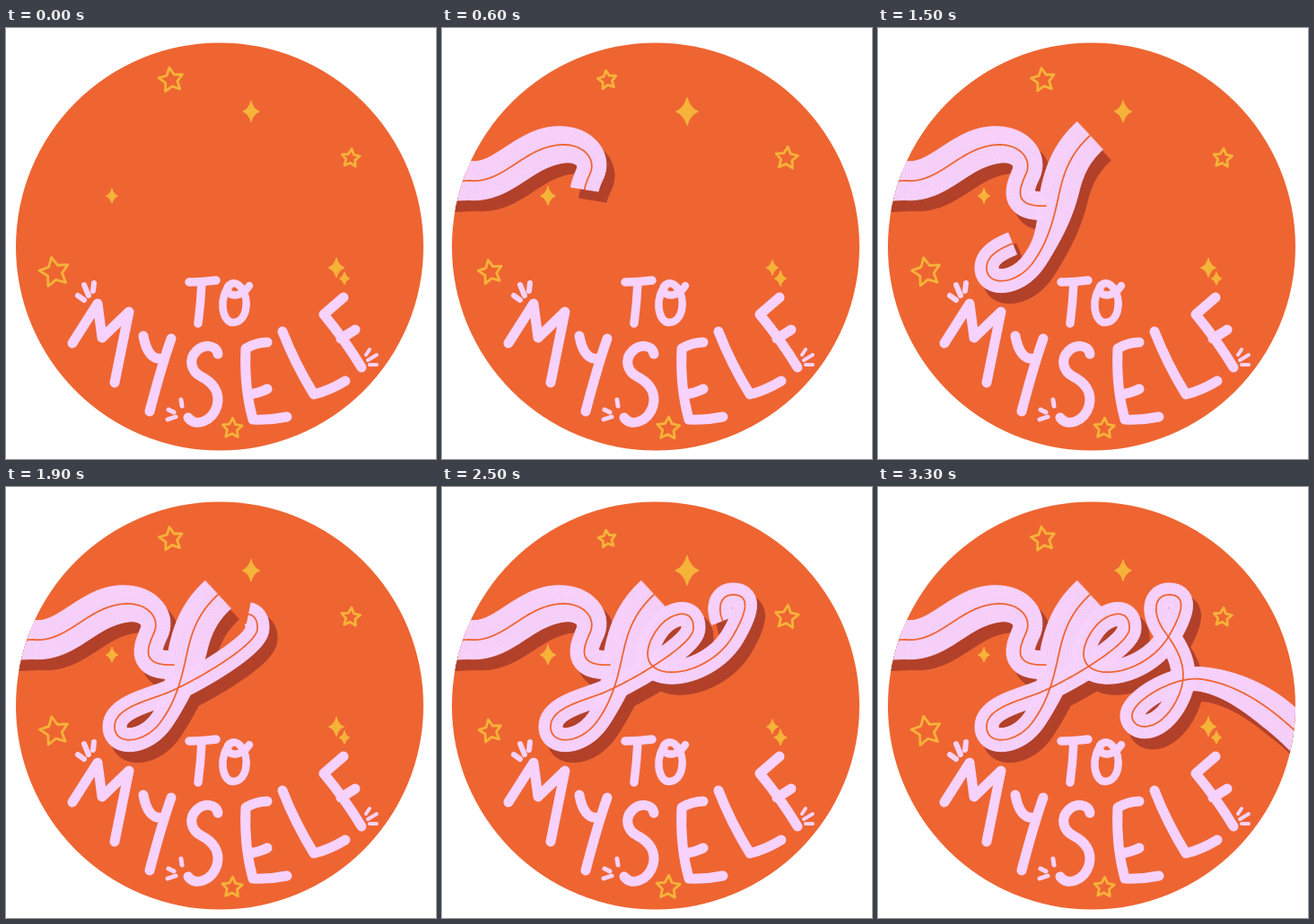
An HTML page with a canvas that plays this animation: 479 px wide and 480 px high, repeating every 3.4 s.

```html
<!DOCTYPE html>
<html lang="en">
<head>
<meta charset="utf-8">
<title>Yes to myself</title>
<style>
html, body { margin: 0; width: 100%; height: 100%; overflow: hidden; background: #fff; }
canvas { display: block; }
svg { position: absolute; }
</style>
</head>
<body>
<canvas id="stage" width="479" height="480" role="img" aria-label="Yes to myself"></canvas>
<!-- Centre lines of the two ribbon parts -->
<svg width="0" height="0" fill="none">
  <path id="lead" d="M4 171L30 170C70 174 92 130 136 130C158 130 172 146 165 162S148 200 188 198"/>
  <path id="word" d="M236 120C212 142 206 165 201 188S190 238 172 262S122 288 121 268S150 240 175 231
    S279 178 280 158S264 138 250 148S218 190 238 202S304 200 324 166S340 120 324 120S304 140 320 162
    S350 208 330 242S282 270 283 254S330 210 360 214S430 235 478 285"/>
</svg>
<script>
const ctx = document.getElementById('stage').getContext('2d');
const ORANGE = '#ee6532', PINK = '#f6d2fd', SHADE = '#b1412a', GOLD = '#f5b339';
const STEP = 100, FRAMES = 34;

const clamp = v => Math.max(0, Math.min(1, v));
const smooth = (from, to, v) => {
  const k = clamp((v - from) / (to - from));
  return k * k * (3 - 2 * k);
};

// Edge offsets along a centre line; width is a function of the fraction travelled
function ribbon(id, width, progress) {
  const path = document.getElementById(id), length = path.getTotalLength(), points = [];
  for (let d = 0; d <= length; d += 2) {
    const { x, y } = path.getPointAtLength(d);
    const p = path.getPointAtLength(Math.max(0, d - 1)), q = path.getPointAtLength(Math.min(length, d + 1));
    const dx = q.x - p.x, dy = q.y - p.y, half = width(d / length) / 2 / Math.hypot(dx, dy);
    points.push({ x, y, nx: -dy * half, ny: dx * half });
  }
  return frame => points.slice(0, Math.round(clamp(progress(frame)) * points.length));
}

const ribbons = [
  ribbon('lead', u => 43 - 12 * smooth(.45, .8, u), f => 1 - (1 - clamp(f / 10)) ** 2),
  ribbon('word', u => 42 - 16 * smooth(.06, .13, u) + 13 * smooth(.86, .96, u), f => clamp((f - 8) / 25) ** 1.13)
];

// Each twinkler pulses around its radius
const stars = [
  { x: 184, y: 58, r: 12, swing: 2, turn: -.15 },
  { x: 384, y: 145, r: 12, swing: -1.5, turn: .1 },
  { x: 54, y: 272, r: 15, swing: 2, turn: -.2 },
  { x: 252, y: 446, r: 12.5, swing: -1, turn: .05 }
];
const sparkles = [
  { x: 273, y: 93, r: 14, swing: -2.5 },
  { x: 118, y: 187, r: 9.5, swing: -1.5 },
  { x: 368, y: 267, r: 9.5, swing: 1.5 },
  { x: 377, y: 279, r: 8, swing: -1 }
];

const letters = [
  [9.5, 'M204 283Q219 283 234 281M218 284Q217 306 214 329'],
  [8.5, 'M251 285C236 298 240 328 253 328C268 328 273 302 261 288C255 281 244 285 247 293C251 301 264 298 271 287'],
  [11, 'M74 351L102 307L107 345L137 316L121 395'],
  [11, 'M153 343C156 360 163 370 174 368M184 346Q174 374 160 427'],
  [11, 'M236 363C234 352 220 352 212 360C203 369 206 382 217 388C231 395 239 406 235 421C230 438 211 445 203 434'],
  [11, 'M291 350Q279 350 267 357Q265 400 275 436Q294 437 313 433M270 408Q281 407 291 402'],
  [11, 'M308 338Q322 374 343 408Q360 404 378 393'],
  [11, 'M376 300L354 319Q378 348 396 378M373 346L389 336'],
  [6, 'M80 298L87 303M87 286L92 298M98 284L97 293'],
  [5, 'M181 425L187 428M180 436L189 433M195 414L196 421'],
  [4, 'M401 364L405 358M403 370L413 364M405 375L413 375']
].map(([width, d]) => [width, new Path2D(d)]);

function band(line, color, ox = 0, oy = 0) {
  ctx.fillStyle = ctx.strokeStyle = color;
  ctx.lineWidth = .8;
  for (let i = 1; i < line.length; i++) {
    const a = line[i - 1], b = line[i];
    ctx.beginPath();
    ctx.moveTo(a.x + a.nx + ox, a.y + a.ny + oy);
    ctx.lineTo(b.x + b.nx + ox, b.y + b.ny + oy);
    ctx.lineTo(b.x - b.nx + ox, b.y - b.ny + oy);
    ctx.lineTo(a.x - a.nx + ox, a.y - a.ny + oy);
    ctx.closePath();
    ctx.fill();
    ctx.stroke();
  }
}

function seam(line) {
  ctx.strokeStyle = ORANGE;
  ctx.lineWidth = 1.8;
  ctx.beginPath();
  line.forEach(p => ctx.lineTo(p.x, p.y));
  ctx.stroke();
}

function star(x, y, r, turn) {
  ctx.beginPath();
  for (let i = 0; i < 10; i++) {
    const a = i * Math.PI / 5 - Math.PI / 2 + turn, d = i % 2 ? r * .5 : r;
    ctx.lineTo(x + d * Math.cos(a), y + d * Math.sin(a));
  }
  ctx.closePath();
  ctx.lineWidth = 2.8;
  ctx.stroke();
}

function sparkle(x, y, r) {
  const w = r * .8, k = .25;
  ctx.beginPath();
  ctx.moveTo(x, y - r);
  ctx.quadraticCurveTo(x + w * k, y - r * k, x + w, y);
  ctx.quadraticCurveTo(x + w * k, y + r * k, x, y + r);
  ctx.quadraticCurveTo(x - w * k, y + r * k, x - w, y);
  ctx.quadraticCurveTo(x - w * k, y - r * k, x, y - r);
  ctx.fill();
  ctx.lineWidth = 1;
  ctx.stroke();
}

function draw(frame) {
  ctx.fillStyle = '#fff';
  ctx.fillRect(0, 0, 479, 480);
  ctx.save();
  ctx.lineCap = ctx.lineJoin = 'round';
  ctx.beginPath();
  ctx.arc(238, 243.5, 227, 0, Math.PI * 2);
  ctx.fillStyle = ORANGE;
  ctx.fill();
  ctx.clip();

  const lines = ribbons.map(part => part(frame));
  lines.forEach(line => band(line, SHADE, 9, 12));
  lines.forEach(line => band(line, PINK));
  lines.forEach(seam);

  ctx.strokeStyle = PINK;
  for (const [width, path] of letters) {
    ctx.lineWidth = width;
    ctx.stroke(path);
  }

  // Two pulses per loop
  const pulse = Math.cos(4 * Math.PI * frame / FRAMES);
  ctx.fillStyle = ctx.strokeStyle = GOLD;
  stars.forEach(s => star(s.x, s.y, s.r + s.swing * pulse, s.turn));
  sparkles.forEach(s => sparkle(s.x, s.y, s.r + s.swing * pulse));
  ctx.restore();
}

const start = performance.now();
function tick() {
  draw(Math.floor((performance.now() - start) / STEP) % FRAMES);
  requestAnimationFrame(tick);
}
tick();
</script>
</body>
</html>
```
